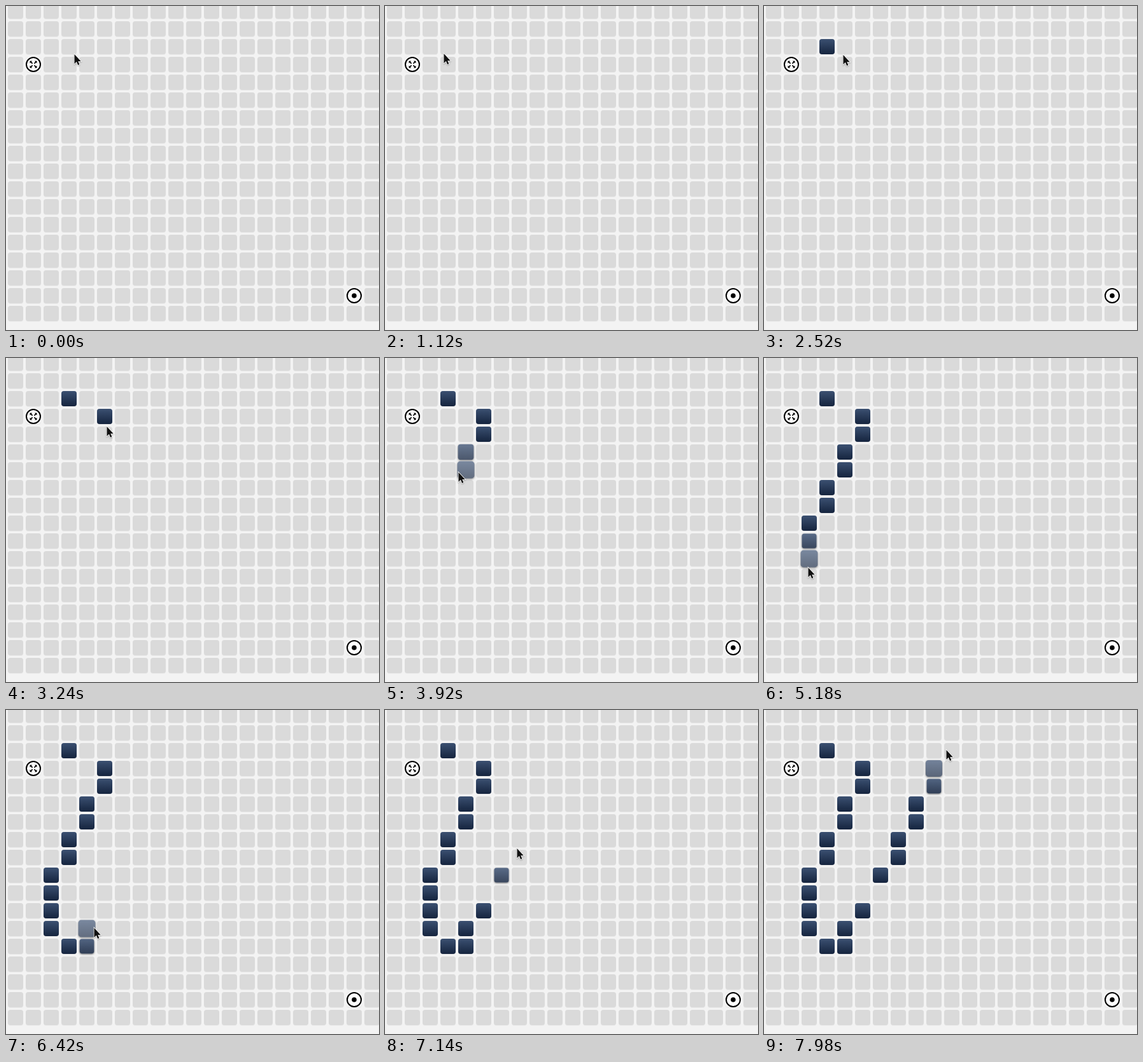
Write an HTML page with a canvas that moves like this. It is 586x510 px and loops after 8000 ms.

```html
<!DOCTYPE html>
<html lang="en">
<head>
<meta charset="utf-8">
<title>Drawing walls on a grid</title>
<style>
html, body { margin: 0; width: 100%; height: 100%; overflow: hidden; background: #f3f3f3; }
canvas { display: block; }
</style>
</head>
<body>
<canvas id="stage" width="586" height="510"></canvas>
<script>
const ctx = document.getElementById('stage').getContext('2d');
const LOOP = 8000, DRAG = 2520, LAG = 40, POP = 400;
const COLS = 21, ROWS = 18, STEP = 28, SIZE = 24, REACH = 7;

// Turning points of the pointer: time, x, y
const path = [
  [0, 107, 75], [720, 102, 75], [1240, 89, 74], [2500, 89, 74],
  [DRAG, 124, 76], [2760, 150, 90], [3240, 158, 107], [3780, 124, 168],
  [3920, 115, 179], [4080, 98, 204], [4240, 94, 226], [4920, 68, 287],
  [5180, 69, 329], [5740, 96, 373], [6070, 120, 371], [6420, 138, 342],
  [6580, 157, 308], [6830, 180, 264], [7110, 205, 226], [7140, 207, 217],
  [7420, 241, 165], [7600, 257, 122], [7740, 271, 92], [7980, 286, 62]
];

// Growth of a new wall: progress, scale, opacity
const pop = [[0, 1.15, 0], [0.15, 1.12, 0.62], [0.55, 1.11, 0.63], [0.73, 0.94, 0.84], [1, 1, 1]];

function sample(keys, t) {
  const i = keys.findIndex(k => k[0] > t);
  if (i < 0) return keys[keys.length - 1].slice(1);
  const a = keys[i - 1], b = keys[i];
  const f = (t - a[0]) / (b[0] - a[0]);
  return [1, 2].map(n => a[n] + (b[n] - a[n]) * f);
}

const centre = (col, row) => [15 + col * STEP, 8 + row * STEP];

// A cell becomes a wall once the pointer gets near its centre.
const walls = new Map([['3,2', DRAG - POP]]);
for (let t = DRAG; t < LOOP; t += 5) {
  const [x, y] = sample(path, t);
  const col = Math.round((x - 15) / STEP), row = Math.round((y - 8) / STEP);
  const [cx, cy] = centre(col, row);
  const key = col + ',' + row;
  const near = Math.abs(x - cx) <= REACH && Math.abs(y - cy) <= REACH;
  if (near && !walls.has(key)) walls.set(key, t + LAG);
}

function tile(fill) {
  ctx.beginPath();
  ctx.roundRect(-SIZE / 2, -SIZE / 2, SIZE, SIZE, 4);
  ctx.fillStyle = fill;
  ctx.fill();
}

function at(x, y, draw) {
  ctx.save();
  ctx.translate(x, y);
  draw();
  ctx.restore();
}

function shade(color, blur) {
  ctx.shadowColor = color;
  ctx.shadowBlur = blur;
  ctx.shadowOffsetY = 1;
}

function cell(col, row) {
  const [x, y] = centre(col, row);
  at(x, y + 1, () => tile('#e9e9e9'));
  at(x, y, () => tile('#dadada'));
}

function ring(col, row, inside) {
  at(...centre(col, row), () => {
    tile('#f3f3f3');
    ctx.beginPath();
    ctx.arc(0, 0, 11, 0, 7);
    ctx.fillStyle = '#fff';
    ctx.fill();
    ctx.lineWidth = 2;
    ctx.strokeStyle = ctx.fillStyle = '#000';
    ctx.stroke();
    inside();
  });
}

function arrows() {
  ctx.lineWidth = 1.6;
  for (let i = 0; i < 4; i++) {
    ctx.rotate(Math.PI / 2);
    ctx.stroke(new Path2D('M1.4 1.4L4.4 4.4'));
    ctx.fill(new Path2D('M5.5 5.5V1.8L1.8 5.5Z'));
  }
}

function dot() {
  ctx.beginPath();
  ctx.arc(0, 0, 3.8, 0, 7);
  ctx.fill();
}

const navy = ctx.createLinearGradient(0, -12, 0, 12);
navy.addColorStop(0, '#3b5071');
navy.addColorStop(1, '#15243e');

function wall(col, row, age) {
  if (age < 0) return;
  const [scale, alpha] = sample(pop, age / POP);
  at(...centre(col, row), () => {
    ctx.scale(scale, scale);
    if (alpha < 1) {
      ctx.globalAlpha = Math.min(1, alpha * 2);
      shade('rgba(0,0,0,.5)', 3);
      tile('#e0e4ea');
      ctx.shadowColor = 'transparent';
    }
    ctx.globalAlpha = alpha;
    tile(navy);
  });
}

const arrow = new Path2D('M0 0V15L3.4 11.8L5.6 17L7.9 16L5.8 11H10.2Z');

function cursor(x, y) {
  at(Math.round(x) + 0.5, Math.round(y) + 1, () => {
    shade('rgba(0,0,0,.3)', 2);
    ctx.lineWidth = 1.6;
    ctx.strokeStyle = '#fff';
    ctx.stroke(arrow);
    ctx.shadowColor = 'transparent';
    ctx.fillStyle = '#111';
    ctx.fill(arrow);
  });
}

// The picture holds between uneven ticks.
function tick(t) {
  const r = t % 140;
  return t - r + (r >= 120 ? 120 : r >= 20 ? 20 : 0);
}

function draw(t) {
  ctx.fillStyle = '#f3f3f3';
  ctx.fillRect(0, 0, 586, 510);
  for (let row = 0; row < ROWS; row++)
    for (let col = 0; col < COLS; col++) cell(col, row);
  ring(1, 3, arrows);
  ring(19, 16, dot);
  if (t >= DRAG)
    for (const [key, start] of walls) wall(...key.split(',').map(Number), t - start);
  cursor(...sample(path, t));
}

const began = performance.now();
function frame() {
  draw(tick((performance.now() - began) % LOOP));
  requestAnimationFrame(frame);
}
frame();
</script>
</body>
</html>
```
